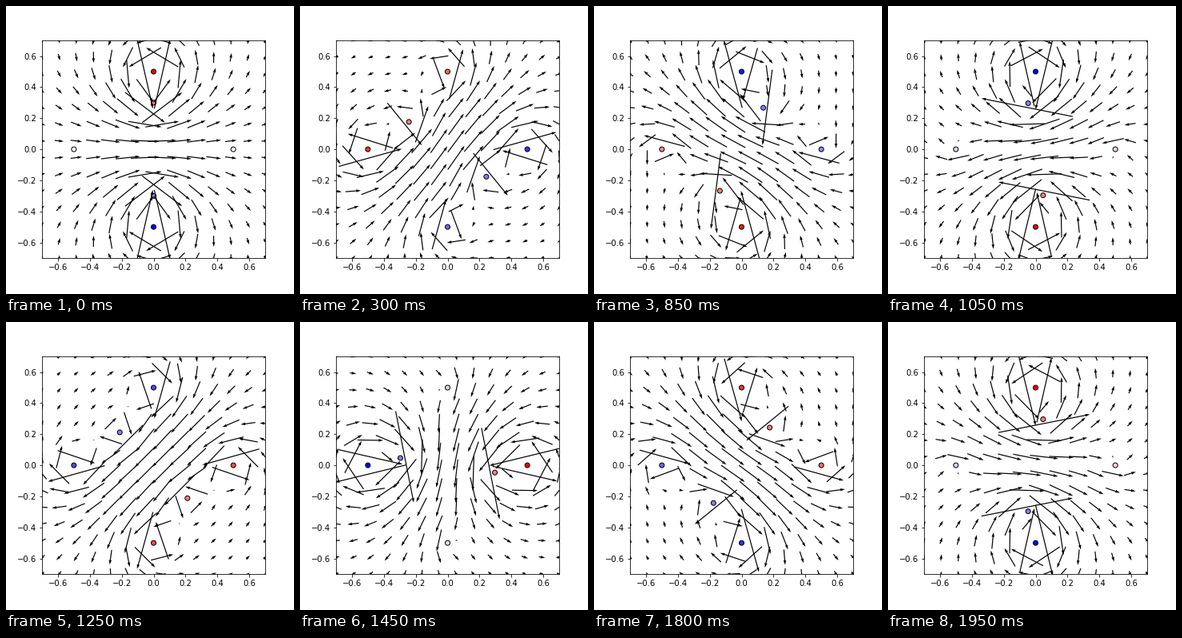
Recreate the animation shown at these times as a matplotlib script. Size 360 by 360 pixels, loop 2000 ms.

```python
import matplotlib.pyplot as plt
import numpy as np
from matplotlib.animation import FuncAnimation

FRAMES = 40
LIMIT = 0.7
ROTOR_RADIUS = 0.3
ROTOR_CURRENT = 0.5
STATOR = 0.5 * np.array([1j, -1, -1j, 1])

axis = np.linspace(-LIMIT, LIMIT, 14)
X, Y = np.meshgrid(axis, axis)
Z = X + 1j * Y


def wires(frame):
    """Complex positions and currents of all wires."""
    angle = 2 * np.pi * frame / FRAMES
    c, s = np.cos(angle), np.sin(angle)
    arm = ROTOR_RADIUS * 1j * np.exp(1j * angle)
    places = np.append(STATOR, [arm, -arm])
    currents = np.array([c, s, -c, -s, ROTOR_CURRENT, -ROTOR_CURRENT])
    return places, currents


def field(places, currents):
    """Each wire adds a circulating field of strength I / r."""
    return sum(1j * i * (Z - p) / abs(Z - p) ** 2
               for p, i in zip(places, currents))


def points(places):
    return np.column_stack([places.real, places.imag])


fig, ax = plt.subplots(figsize=(5, 5), dpi=72)
fig.subplots_adjust(left=0.125, right=0.9, bottom=0.125, top=0.88)
ax.set_xlim(-LIMIT, LIMIT)
ax.set_ylim(-LIMIT, LIMIT)

places, currents = wires(0)
B = field(places, currents)
dots = ax.scatter(places.real, places.imag, c=currents, s=36, cmap="bwr",
                  vmin=-1, vmax=1, edgecolors="k", linewidths=1)
arrows = ax.quiver(X, Y, B.real, B.imag, pivot="mid", scale=57.4)


def update(frame):
    places, currents = wires(frame)
    B = field(places, currents)
    dots.set_offsets(points(places))
    dots.set_array(currents)
    arrows.set_UVC(B.real, B.imag)
    return dots, arrows


anim = FuncAnimation(fig, update, frames=FRAMES, interval=50,
                     repeat=True, repeat_delay=0)
plt.show()
```
